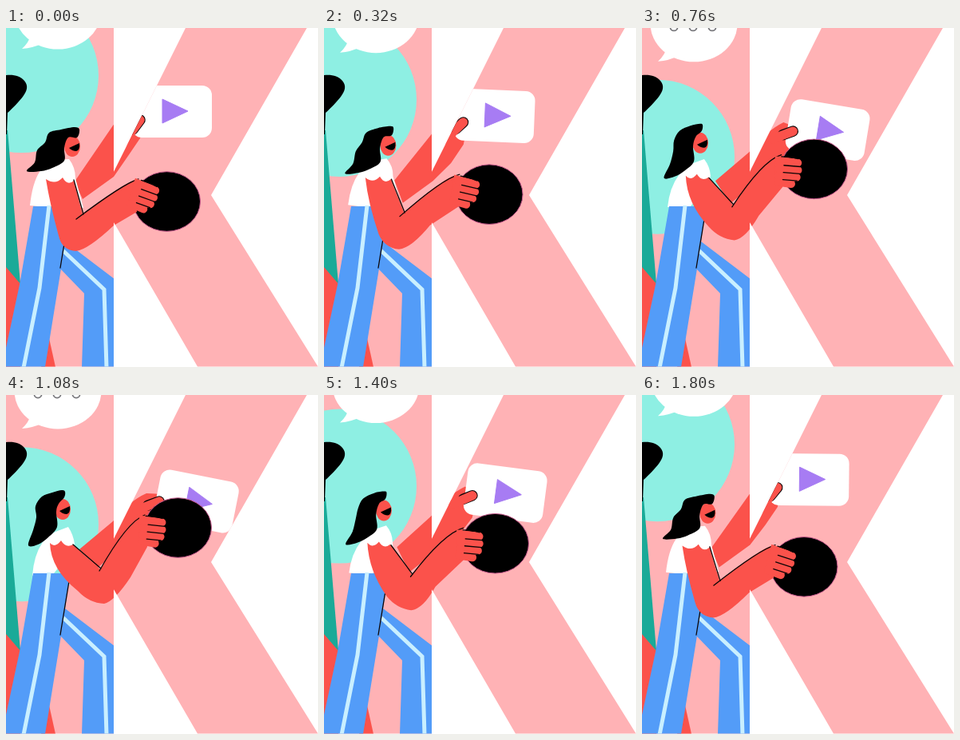
These frames come from a looping animation (391 px wide and 424 px high, 1.84 s). An HTML page:

```html
<!DOCTYPE html>
<html lang="en">
<head>
<meta charset="utf-8">
<title>Letter K illustration</title>
<style>
  html, body { margin: 0; width: 100%; height: 100%; overflow: hidden; background: #fff; }
  svg { display: block; width: 391px; height: 424px; }
  .skin { fill: #fb524b; }
  .line { fill: none; stroke: #0c0506; stroke-width: 1.3; stroke-linecap: round; stroke-linejoin: round; }
  .stripe { fill: none; stroke: #c9efff; stroke-width: 5; }
  .blue { fill: #539cf8; }
  .white { fill: #fff; }
  .finger { fill: none; stroke: #fb524b; stroke-width: 10; stroke-linecap: round; }
</style>
</head>
<body>
<svg viewBox="0 0 391 424">
  <defs>
    <clipPath id="letter">
      <path d="M0 0H135V180L225 0H377L257 209L391 423.5H240L135 243V423.5H0Z"/>
    </clipPath>
  </defs>
  <g clip-path="url(#letter)">
    <rect width="391" height="424" fill="#ffb2b5"/>
    <circle id="disc" cx="19.5" cy="59.5" r="96.5" fill="#8eefe3"/>
    <g id="bubble">
      <ellipse class="white" cx="65" cy="-21" rx="54.5" ry="47.5"/>
      <path class="white" d="M31 8Q29 18 20 26Q34 25 46 19Z"/>
      <g fill="none" stroke="#77777b" stroke-width="1.8">
        <circle cx="40" cy="-17" r="4.6"/>
        <circle cx="64" cy="-17" r="4.6"/>
        <circle cx="88" cy="-17" r="4.6"/>
      </g>
    </g>

    <!-- neighbour at the left edge -->
    <path class="skin" d="M0 296L18 317V424H0Z"/>
    <path d="M0 128H2L18 320L0 299Z" fill="#1aaa98"/>
    <path d="M0 59C10 58 18 60 23 66C28 72 27 78 21 86C16 92 8 101 2 106L1 133H0Z"/>

    <path id="farArm" class="skin"/>
    <path id="shirt" class="white"/>
    <g id="face">
      <ellipse class="skin" rx="10" ry="13"/>
      <path d="M-4 2L9 -4Q10 5 5 6Q0 6 -4 2Z"/>
    </g>
    <path id="hair"/>

    <g id="card">
      <rect class="white" x="-50" y="-32.5" width="100" height="65" rx="12"/>
      <path d="M-12 -15.5L20 -.5L-12 14.5Z" fill="#a77cf3" stroke="#a77cf3" stroke-linejoin="round"/>
    </g>
    <path id="thumbEdge" fill="none" stroke="#0c0506" stroke-width="13.5" stroke-linecap="round"/>
    <path id="thumb" fill="none" stroke="#fb524b" stroke-width="11.4" stroke-linecap="round"/>

    <!-- trousers -->
    <path class="skin" d="M54 388L62 424H44Z"/>
    <path class="blue" d="M74 267L136 314V424H95L98 332L68 301Z"/>
    <path class="stripe" d="M71 278L123 327L126 425"/>
    <path class="blue" d="M34 223H76L79 233L69 301L49 424H0V400L17 321Z"/>
    <path class="stripe" d="M54 222L42 325L22 425"/>
    <path class="line" d="M79 233L68 300"/>

    <ellipse id="ball" rx="42" ry="37.3" stroke="#c4578a" stroke-width="1"/>
    <path id="arm" class="skin"/>
    <path id="armLine" class="line"/>
    <g id="hand">
      <path class="skin" d="M-30 -15L-6 -14L0 -4V10L-8 22L-28 20Z"/>
      <path class="finger" d="M-24 -9L-1 -9M-24 0H0M-24 9H-1M-24 17L-7 18"/>
      <path class="line" d="M-18 -4.5H3M-18 4.5H3M-18 13.5H0M-22 -15Q-10 -16 -1 -14"/>
    </g>
  </g>
</svg>
<script>
const LOOP = 1840, STEP = 40;
const TIMES = [0, 320, 560, 760, 1080, 1400, 1800];
const REACH = [0, .2, .56, .82, 1, .65, .05];      // woman, card and ball
const DRIFT = [0, .28, .68, .95, .955, .51, .02];  // disc and bubble
const MID = .56;

// Three poses per part: reach 0, MID and 1.
const poses = {
  farArm: [
    "M86 192L134 122Q150 100 160 112L172 120L168 138L153 160L135 186L96 214Z",
    "M91 190L134 149Q155 122 176 113L190 125L184 153L168 175L140 195L105 222Z",
    "M92 193L134 158Q155 132 176 123L198 124L190 150L175 165L145 190L115 216Z"],
  shirt: [
    "M30 222Q33 194 42 180Q50 168 60 165L79 164Q87 174 87 188L97 225L60 225Z",
    "M31 222Q34 198 46 183Q52 172 62 168L78 163Q86 172 86 184L88 196L60 225Z",
    "M33 226Q35 200 46 184Q52 176 62 171L78 165Q84 174 86 186L82 196L60 223Z"],
  arm: [
    "M50 189Q55 220 66 260Q70 278 88 279Q103 277 135 247L164 230L162 190Q148 194 88 239L96 233L85 191Q77 198 71 187Q62 197 50 189Z",
    "M54 185Q56 220 76 253Q88 269 106 271Q121 270 137 242L174 210L170 171Q150 176 106 229L108 226L83 187Q75 194 69 184Q61 193 54 185Z",
    "M55 185Q56 218 90 245Q104 260 123 261Q136 258 156 228L177 190L173 151Q152 158 117 220L118 218L84 187Q75 192 69 182Q61 192 55 185Z"],
  armLine: [
    "M85 190L97 233M88 239Q148 194 166 189",
    "M84 188L109 226M106 229Q150 176 174 170",
    "M84 187L119 217M117 220Q152 158 174 150"],
  thumb: [
    "M145 146L168 115",
    "M160 136L184 124",
    "M164 144L192 133"],
  thumbEdge: [
    "M159 127L168 115",
    "M173 129L184 124",
    "M178 138L192 133"],
  hair: [
    "86 124 69 127 54 131 49 143 39 153 36 168 26 179 44 179 58 175 73 166 73 150 78 137 89 137 92 127",
    "77 121 64 123 50 130 44 142 40 155 36 171 27 186 42 184 55 178 67 168 66 150 70 136 78 131 80 123",
    "70 119 58 122 45 127 37 139 38 153 34 169 28 188 40 187 53 178 64 165 63 146 66 136 73 128 74 121"],
  face: ["83 148", "76 145", "71 143"],
  card: ["208 104.5 0", "224.5 120 6.5", "238.5 133 11.3"],
  ball: ["201.5 217", "213.6 190.5", "215.5 166"],
  hand: ["185 212 20", "194 190 6", "195.5 168.5 6"]
};
const SHAPES = ["farArm", "shirt", "arm", "armLine", "thumb", "thumbEdge"];
const MOVERS = ["face", "ball", "card", "hand"];

const NUM = /-?\d+(\.\d+)?/g;
const put = (id, name, value) => document.getElementById(id).setAttribute(name, value);

// Smooth periodic curve through the keyed values.
function track(values) {
  const n = TIMES.length;
  const time = i => TIMES[(i + n) % n] + LOOP * Math.floor(i / n);
  const val = i => values[(i + n) % n];
  const slope = i => {
    const a = time(i) - time(i - 1), b = time(i + 1) - time(i);
    return ((val(i) - val(i - 1)) / a * b + (val(i + 1) - val(i)) / b * a) / (a + b);
  };
  return t => {
    let i = n - 1;
    while (TIMES[i] > t) i--;
    const h = time(i + 1) - time(i), s = (t - time(i)) / h, r = 1 - s;
    return r * r * ((1 + 2 * s) * val(i) + s * h * slope(i))
         + s * s * ((1 + 2 * r) * val(i + 1) - r * h * slope(i + 1));
  };
}
const reach = track(REACH), drift = track(DRIFT);

// Quadratic blend of the three poses, number by number.
function blend(id, q) {
  const [a, b, c] = poses[id];
  const wa = (q - MID) * (q - 1) / MID;
  const wb = q * (q - 1) / (MID * (MID - 1));
  const wc = q * (q - MID) / (1 - MID);
  const nb = b.match(NUM), nc = c.match(NUM);
  let i = 0;
  return a.replace(NUM, x => {
    const v = wa * x + wb * nb[i] + wc * nc[i];
    i++;
    return v.toFixed(2);
  });
}

// Closed smooth outline through a list of points.
function outline(text) {
  const v = text.split(" ").map(Number), n = v.length / 2;
  const at = i => { const k = (i + n) % n * 2; return [v[k], v[k + 1]]; };
  let d = "M" + at(0);
  for (let i = 0; i < n; i++) {
    const [p, a, b, c] = [at(i - 1), at(i), at(i + 1), at(i + 2)];
    const out = a.map((x, k) => x + (b[k] - p[k]) / 6);
    const into = b.map((x, k) => x - (c[k] - a[k]) / 6);
    d += `C${out} ${into} ${b}`;
  }
  return d + "Z";
}

function draw(t) {
  const q = reach(t), p = drift(t);
  put("disc", "cy", 59.5 + 107 * p);
  put("bubble", "transform", `translate(0 ${16.7 * p})`);
  for (const id of SHAPES) put(id, "d", blend(id, q));
  put("hair", "d", outline(blend("hair", q)));
  for (const id of MOVERS) {
    const [x, y, turn = 0] = blend(id, q).split(" ");
    put(id, "transform", `translate(${x} ${y}) rotate(${turn})`);
  }
}

const start = performance.now();
function tick() {
  const t = (performance.now() - start) % LOOP;
  draw(Math.floor(t / STEP) * STEP);
  requestAnimationFrame(tick);
}
tick();
</script>
</body>
</html>
```
